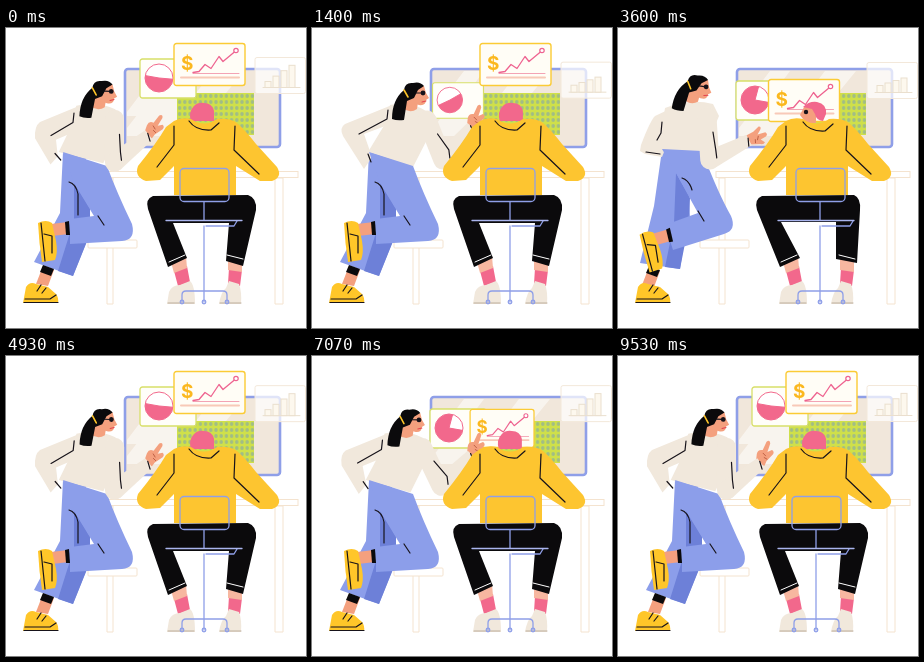
An HTML page for the animation above (9590 ms loop, 300x300 px).

```html
<!DOCTYPE html>
<html lang="en">
<head>
<meta charset="utf-8">
<title>Desk scene</title>
<style>
html,body{margin:0;width:100%;height:100%;overflow:hidden;background:#fff}
svg{display:block;width:100vw;height:100vh}
.n{fill:none;stroke-linecap:round;stroke-linejoin:round}
.ink{stroke:#17131a;stroke-width:1.2}
</style>
</head>
<body>
<svg viewBox="0 0 300 300">
<defs>
<pattern id="dots" x="171" y="65" width="5.200" height="6" patternUnits="userSpaceOnUse">
<rect width="6" height="6" fill="#cfe04a"/>
<ellipse cx="2.600" cy="3" rx="1.700" ry="2" fill="#a0bd86"/>
</pattern>
</defs>
<rect width="300" height="300" fill="#fff"/>

<g id="screen">
<rect x="119" y="41" width="155" height="78" rx="3" fill="#f1e7db" stroke="#8f9fe8" stroke-width="2.600"/>
<path d="M152 43H172L138 88H121V84ZM207 43H238L220 65H190ZM121 100L146 68H171V108H121Z" fill="#fff" opacity=".55"/>
<rect x="171" y="65" width="77" height="42" fill="url(#dots)"/>
</g>

<g fill="#fff" stroke="#f4e3cf">
<path d="M101 150H107V276H101ZM269 150H277V276H269Z"/>
<rect x="82" y="212" width="49" height="8" rx="1"/>
<rect x="98" y="143.500" width="194" height="6"/>
</g>

<g id="bars">
<rect x="249" width="50.500" height="36" rx="2" fill="#fff" fill-opacity=".72" stroke="#f3e8da"/>
<path class="n" d="M257 30H294" stroke="#eadfce"/>
<g id="cols" fill="#fdf8ee" stroke="#eadfce"></g>
</g>

<g id="pie">
<rect width="56" height="39" rx="2.500" fill="#fffef9" stroke="#d8df69" stroke-width="1.300"/>
<circle cx="19" cy="19" r="14" fill="#fff" stroke="#f2688c"/>
<path id="slice" fill="#f2688c" stroke="#f2688c" stroke-linejoin="round"/>
</g>

<g id="chart">
<rect width="71" height="42" rx="2.500" fill="#fffdf6" stroke="#fbcb35" stroke-width="1.400"/>
<text x="7" y="26" font-family="Inter,Arial,sans-serif" font-weight="700" font-size="19" fill="#fbb81f">$</text>
<path class="n" d="M19 30H65" stroke="#f3a3b4"/>
<path class="n" d="M7 34H65" stroke="#f8c9b8" stroke-width="2"/>
<path class="n" d="M19 29L25 28L31 21L37 25L45 13L49 18L61 8" stroke="#ee6390" stroke-width="1.300"/>
<circle cx="62" cy="7" r="2.200" fill="#fff" stroke="#ee6390" stroke-width="1.200"/>
</g>

<g id="legs"></g>
<g id="ankle">
<path d="M37 238L48 242L42 258L30 256Z" fill="#f4a07e"/>
<path d="M37 237L48 241L45 248L34 244Z" fill="#0b0a0c"/>
</g>
<g>
<path d="M17 275L20 259Q24 253 30 256L42 259L50 266Q53 270 52 275Z" fill="#ffc629"/>
<path class="n ink" d="M18 274.500H52M19 271H44L50 267M35 257L31 263M40 260L36 265"/>
</g>
<g id="torso"></g>
<g id="thigh"></g>
<g id="foot">
<path d="M45 196L62 194L63 206L46 208Z" fill="#f4a07e"/>
<path d="M59 194L63 193L64 207L60 207Z" fill="#0b0a0c"/>
<path d="M32 195Q40 191 46 195L50 213Q52 225 49 232L36 234Q33 215 32 195Z" fill="#ffc629"/>
<path class="n ink" d="M35 195L39 233M38 206L46 208V225"/>
</g>
<g id="head">
<path d="M93 68L90 80Q98 86 105 81L106 74Z" fill="#f4a07e"/>
<path d="M100 57L112 58L114 65L117 70L114 72Q114 78 107 77L97 74Z" fill="#f4a07e"/>
<path d="M92 62Q93 54 101 55Q108 53 112 58L106 62L102 70L95 73L92 92Q85 93 80 91Q80 72 92 62Z" fill="#0b0a0c"/>
<circle cx="111" cy="65" r="2.400" fill="#17131a"/>
<path class="n ink" d="M104 65H111"/>
<path class="n" d="M110 74L114 73" stroke="#e5434f"/>
<path class="n" d="M92 62L96 69" stroke="#ffc629" stroke-width="1.600"/>
</g>
<g id="arm">
<path id="upper" class="n" stroke="#f1e8dc" stroke-width="19"/>
<g id="hand" fill="#f4a07e">
<path id="point" d="M-5 2L-6 -8Q-6 -13 -1 -13L1 -22Q4 -25 5 -21L4 -12L8 -15Q11 -14 10 -11L5 -3L4 2Z"/>
<path id="open" d="M-5 2L-6 -7L-9 -14Q-8 -17 -5 -14L-2 -10L-1 -18Q2 -20 3 -17L4 -11L8 -14Q10 -12 8 -9L4 2Z"/>
<path class="n" d="M0 -10L3 -8M2 -6L5 -5" stroke="#b8583e" stroke-width=".8"/>
</g>
<path id="fore" fill="#f1e8dc"/>
<path id="cuff" class="n ink"/>
<path id="fold" class="n ink"/>
</g>

<g id="man">
<path d="M168 243L181 238L184 254L172 258ZM223 240L236 242L234 258L222 256Z" fill="#f2688c"/>
<path d="M165 234L180 228L181 240L168 245ZM222 230L236 233V244L222 242Z" fill="#f7b7a0"/>
<path d="M161 276L163 264Q166 257 174 257L184 253Q189 257 189 276ZM213 276Q215 264 220 260L223 253L233 256Q236 264 235 276Z" fill="#f1e8dc"/>
<path class="n" d="M162 275H188M214 275H235" stroke="#bcae9d"/>
<path id="trousers" fill="#0b0a0c"/>
<path class="n" d="M163 234L179 227M221 227L237 231" stroke="#fff"/>
<path id="crown" d="M185 93Q182 84 188 78Q192 74 198 75Q206 75 208 83V93Z" fill="#f2688c"/>
<g id="profile">
<path d="M186 79H198V95H189L185 91L182 87Z" fill="#f4a07e"/>
<path d="M185 79Q191 73 199 74Q209 76 208 86L205 93Q198 92 197 86L194 81Z" fill="#f2688c"/>
<circle cx="188" cy="84" r="2.200" fill="#17131a"/>
</g>
<path d="M168 93Q175 89 185 91Q198 100 211 91Q224 90 231 95Q240 103 250 116L271 139Q277 149 266 153H254L230 138V167H168V138L154 152L140 153Q128 149 132 138Q150 116 160 99Z" fill="#fdc530"/>
<path class="n ink" d="M168 98V117L151 139M229 98L228 122L253 146"/>
<path id="collar" class="n ink" d="M183 93Q190 103 205 102L213 95"/>
</g>

<g id="chair" class="n" stroke="#8f9fe8" stroke-width="1.300">
<rect x="174" y="140.500" width="49" height="33" rx="4"/>
<path d="M198 174V192M198 198V274M200 198H228L231 193"/>
<path d="M176 274V267Q176 263 180 263H217Q221 263 221 267V274"/>
<circle cx="176" cy="274" r="1.800"/><circle cx="198" cy="274" r="1.800"/><circle cx="221" cy="274" r="1.800"/>
</g>
<path class="n" d="M160 192.500H236" stroke="#aab5ee" stroke-width="1.300"/>
</svg>
<script>
const $ = id => document.getElementById(id);
const PERIOD = 4795;
const CREAM = '#f1e8dc', BLUE = '#8c9eea', SHADE = '#6d80d8';

const set = (el, attrs) => { for (const k in attrs) el.setAttribute(k, attrs[k]); };
const make = (tag, parent, attrs) => {
  const el = document.createElementNS('http://www.w3.org/2000/svg', tag);
  set(el, attrs);
  return parent.appendChild(el);
};
const move = (id, x, y, extra = '') => set($(id), { transform: `translate(${x} ${y}) ${extra}` });
const show = (id, on) => set($(id), { visibility: on ? 'visible' : 'hidden' });
const lerp = (a, b, p) => a + (b - a) * p;
const blend = (a, b, p) => a.map((v, i) => lerp(v, b[i], p));

// Timing: eased step, there-and-back, and a single soft pulse.
const unit = (t, a, b) => Math.min(1, Math.max(0, (t - a) / (b - a)));
const ramp = (t, a, b) => { const p = unit(t, a, b); return p * p * (3 - 2 * p); };
const stay = (t, a, b, c, d) => ramp(t, a, b) - ramp(t, c, d);
const pulse = (t, a, b) => Math.sin(Math.PI * unit(t, a, b)) ** 2;

// Blend two path strings of the same structure.
function mix(a, b, u) {
  const n = b.match(/[\d.]+/g);
  let i = 0;
  return a.replace(/[\d.]+/g, v => lerp(+v, +n[i++], u).toFixed(2));
}

function shape(parent, fill, a, b) {
  const el = make('path', $(parent), fill ? { fill } : { class: 'n ink' });
  return u => set(el, { d: mix(a, b, u) });
}

// Each shape has a leaning and an upright outline.
const legs = [
  shape('legs', BLUE, 'M57 124L80 125L80 190L84 205L67 248L28 234L54 185Z',
    'M44 122L70 123L72 190L66 215L62 241L22 235L36 178Z'),
  shape('legs', SHADE, 'M68 155L84 180L84 206L67 248L52 243L68 192Z',
    'M58 145L72 170L70 200L62 241L47 239L56 195Z'),
  shape('thigh', BLUE, 'M57 124L101 138Q111 165 126 196Q130 212 116 213L64 216L64 191L88 188L68 155Z',
    'M44 121L84 123Q100 165 113 188Q119 202 106 206L55 222L47 197L80 185L58 145Z'),
  shape('thigh', '', 'M63 154Q70 156 72 166L72 187M92 188L98 197', 'M64 150Q70 152 73 159L74 162M80 183L86 193')
];
const torso = [
  shape('torso', CREAM, 'M80 77L33 96Q27 100 31 108L52 141L60 129L52 106L76 97Z',
    'M54 80L37 88Q32 93 23 117Q22 123 27 126L44 129L46 124L44 112L58 100Z'),
  shape('torso', CREAM, 'M78 77Q98 73 114 83L122 98L101 139L56 124L73 96Z',
    'M47 80Q72 70 95 76L101 88L86 124L43 124L44 100Z'),
  shape('torso', '', 'M76 82L75 91L47 106M56 126L59 134', 'M44 94L43 105L39 112M28 124L42 126')
];

const cols = [0, 1, 2, 3].map(i => make('rect', $('cols'), { x: 259 + i * 8, width: 6 }));

function drawCards(t) {
  const pie = stay(t, 600, 1250, 3950, 4450);
  const chart = stay(t, 1550, 2300, 4150, 4650);
  const land = pulse(t, 1775, 2775);
  const place = (id, w, h, x, y, s) =>
    move(id, x, y, `scale(${s}) translate(${-w / 2} ${-h / 2})`);
  place('pie', 56, 39, lerp(162, 146, pie), lerp(50.5, 72.5, pie), 1 - .09 * pulse(t, 900, 1900));
  place('chart', 71, 42, lerp(203.5, 186, chart) + 4 * land, lerp(36.5, 72.5, chart), 1 - .1 * land);

  // The slice tilts while the card is dragged, then fills up.
  const full = stay(t, 1450, 1950, 3950, 4450);
  const tilt = 35 * pulse(t, 600, 2200);
  const from = 5 + 5 * full - tilt, to = 190 + 95 * full - tilt;
  const rim = deg => {
    const r = deg * Math.PI / 180;
    return `${19 + 13.5 * Math.cos(r)} ${19 + 13.5 * Math.sin(r)}`;
  };
  set($('slice'), { d: `M19 19L${rim(from)}A13.5 13.5 0 ${+(to - from > 180)} 1 ${rim(to)}Z` });

  const dip = (1 - Math.cos(4 * Math.PI * t / PERIOD)) / 2;
  move('bars', 0, 29.5 + 5 * dip);
  cols.forEach((c, i) => {
    const h = lerp(6 + 5.4 * i, 7 + 2.5 * i, dip);
    set(c, { y: 30 - h, height: h });
  });
}

function drawArm(t, lean, up) {
  const [sx, sy] = blend([115, 92], [89, 89], lean);
  const press = ramp(t, 300, 1200);
  const lift = 20 * pulse(t, 200, 1200) + 24 * pulse(t, 1450, 2150);
  const reach = blend([143, 107], [160, 99], press * (1 - ramp(t, 3900, 4600)));
  const [wx, wy] = blend([reach[0], reach[1] - lift], [131, 112], up);

  // Two-bone solve: the elbow hangs below the line from shoulder to wrist.
  const upper = 43, fore = 44;
  const dx = wx - sx, dy = wy - sy, d = Math.min(Math.hypot(dx, dy), upper + fore - .1);
  const along = (upper ** 2 - fore ** 2 + d * d) / (2 * d);
  const drop = Math.sqrt(upper ** 2 - along ** 2);
  const ex = sx + (dx * along - dy * drop) / d, ey = sy + (dy * along + dx * drop) / d;

  const fx = (wx - ex) / fore, fy = (wy - ey) / fore;
  const off = (x, y, r) => `${x - fy * r} ${y + fx * r}`;
  set($('upper'), { d: `M${sx} ${sy}L${ex} ${ey}` });
  set($('fore'), { d: `M${off(ex, ey, 9.5)}L${off(wx, wy, 6)}L${off(wx, wy, -6)}L${off(ex, ey, -9.5)}Z` });
  set($('cuff'), { d: `M${off(wx - fx * 3, wy - fy * 3, 5.5)}L${off(wx, wy, -2)}` });
  set($('fold'), { d: `M${lerp(sx, ex, .35) + 5} ${lerp(sy, ey, .35)}L${ex + 6} ${ey - 10}L${ex + 7} ${ey - 2}` });
  move('hand', wx, wy, `rotate(${lerp(25 - 13 * press, 68, up)})`);
  show('point', up < .5);
  show('open', up >= .5);
}

function draw(t) {
  const up = stay(t, 2400, 3000, 3900, 4500);
  const lean = lerp(.25 * (1 - pulse(t, 0, 2800)), 1, up);
  drawCards(t);

  legs.forEach(f => f(up));
  torso.forEach(f => f(lean));
  move('ankle', -6 * up, up);
  move('foot', -9 * up, 10 * up, `rotate(${-9 * up} 42 205)`);
  move('head', -23 * lean, -7 * lean, `rotate(${8 * lean} 105 66)`);
  drawArm(t, lean, up);

  set($('trousers'), { d: mix(
    'M147 168Q139 171 142 181L162 239L181 230L167 195H223L220 233L237 238L250 182Q251 170 242 167Z',
    'M144 168Q136 171 139 182L162 239L182 230L163 194H218L218 231L239 235L242 182Q243 170 236 167Z', up) });
  move('crown', 3 * pulse(t, 0, 3200), 0);
  show('crown', up < .5);
  show('profile', up >= .5);
  move('collar', 2 * up, up);
  move('chair', 4 * up, 0);
}

const start = performance.now();
function tick() {
  draw((performance.now() - start) % PERIOD);
  requestAnimationFrame(tick);
}
draw(0);
requestAnimationFrame(tick);
</script>
</body>
</html>
```
